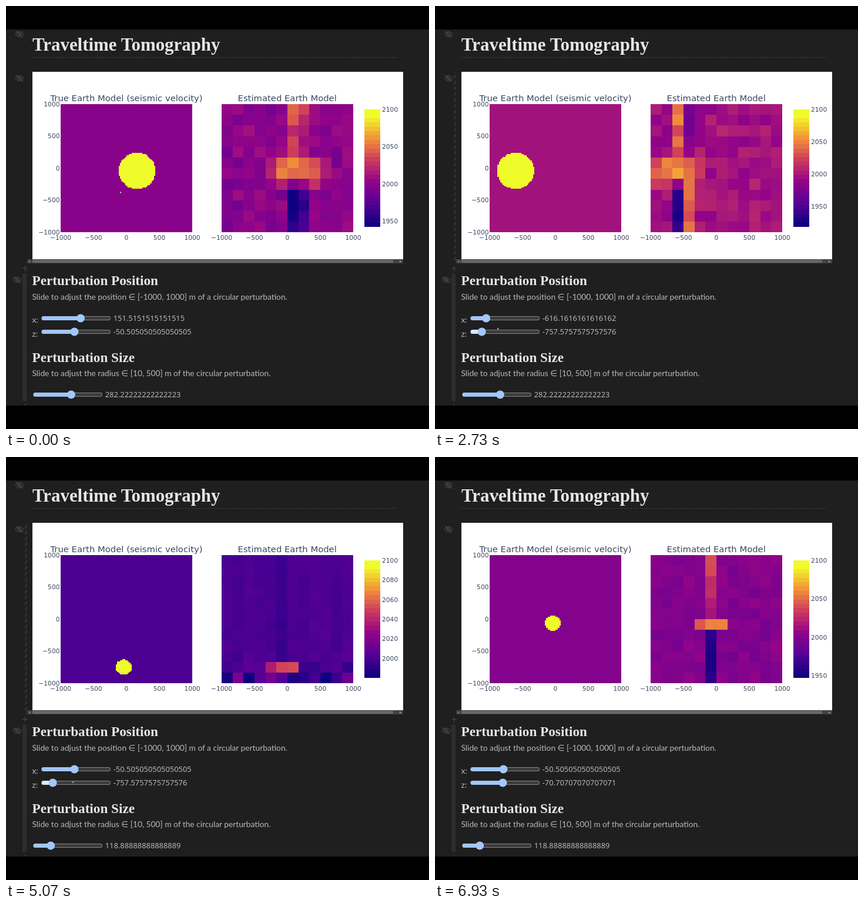
An HTML page with a canvas that plays this animation: 720x720 px, repeating every 6990 ms.

```html
<!DOCTYPE html>
<html lang="en">
<head>
<meta charset="utf-8">
<title>Traveltime Tomography</title>
<style>
  html, body { margin: 0; width: 100%; height: 100%; overflow: hidden; background: #000; }
  canvas, svg { position: absolute; left: 0; top: 0; width: 720px; height: 720px; }
  .h { font: bold 23.2px "Liberation Serif", serif; fill: #e6e6e6; }
  .h1 { font-size: 30.9px; }
  .p { font: 13.75px Lato, "DejaVu Sans", sans-serif; fill: #b9b9b9; }
  .v { font: 12.9px "Noto Sans", "Open Sans", sans-serif; fill: #b9b9b9; }
  .t { font: 14.8px "DejaVu Sans", sans-serif; fill: #3b4660; text-anchor: middle; }
  .k { font: 10.7px "DejaVu Sans", sans-serif; fill: #3b4660; }
  .mid { text-anchor: middle; }
  .end { text-anchor: end; }
</style>
</head>
<body>
<canvas id="stage" width="720" height="720"></canvas>
<svg id="labels" viewBox="0 0 720 720"></svg>
<script>
const LOOP = 6990;
const BEFORE = -200;
const ctx = document.getElementById('stage').getContext('2d');
const labels = document.getElementById('labels');

// Plot boxes share top and size
const TRUE_LEFT = 93, EST_LEFT = 367, TOP = 167, WIDTH = 224, HEIGHT = 218.4;

// Evenly spaced colour stops, low to high velocity
const RAMP = ['100080', '570096', '930488', 'cf3c5c', 'f39637', 'f0fb2a']
  .map(hex => [0, 2, 4].map(i => parseInt(hex.slice(i, i + 2), 16)));

// steps: [time, setting from 0 to 99]
const SLIDERS = [
  { left: 61, y: 531.5, min: -1000, max: 1000, steps: [[BEFORE, 57], [1600, 19], [4530, 47]] },
  { left: 61, y: 554.5, min: -1000, max: 1000, steps: [[BEFORE, 47], [2200, 12], [5270, 46]] },
  { left: 47, y: 661.5, min: 10, max: 500, steps: [[BEFORE, 55], [3800, 22]] }
];

// Each run reads the sliders at `from` and shows its result at `at`.
// low: lowest velocity; side: share of the streak in the next column
const RUNS = [
  { from: BEFORE, at: -100, low: 1942, side: .7 },
  { from: 1600, at: 2400, low: 1918, side: -.6 },
  { from: 2200, at: 2800, low: 1975, side: 0 },
  { from: 3800, at: 4200, low: 1954, side: 0 },
  { from: 4530, at: 5070, low: 1980, side: 0 },
  { from: 5270, at: 5730, low: 1947, side: 0 }
];

const POINTER = [
  [0, 195, 317], [400, 112, 664], [730, 97, 538], [1530, 90, 533],
  [2130, 81, 555], [2730, 107, 549], [3600, 85, 662], [4270, 107, 547],
  [5270, 115, 554], [5600, 215, 394], [6270, 120, 645], [6930, 107, 64]
];

const latest = (list, test) => list.filter(test).pop();
const mix = (a, b, f) => a + (b - a) * f;

function ramp(v) {
  const p = Math.max(0, Math.min(1, v)) * (RAMP.length - 1);
  const i = Math.min(Math.floor(p), RAMP.length - 2);
  return `rgb(${RAMP[i].map((n, k) => Math.round(mix(n, RAMP[i + 1][k], p - i)))})`;
}

function noise(a, b, seed) {
  const s = Math.sin(a * 127.1 + b * 311.7 + seed * 74.7) * 43758.5453;
  return (s - Math.floor(s)) * 2 - 1;
}

function settingAt(s, t) {
  return latest(s.steps, e => e[0] <= t)[1];
}

// One division keeps the printed digits exact
function valueAt(s, t) {
  return (s.min * 99 + (s.max - s.min) * settingAt(s, t)) / 99;
}

for (const run of RUNS) {
  [run.x, run.z, run.r] = SLIDERS.map(s => valueAt(s, run.from));
  run.base = (2000 - run.low) / (2100 - run.low);
}

function pointerAt(t) {
  const a = latest(POINTER, p => p[0] <= t);
  const b = POINTER[POINTER.indexOf(a) + 1] || a;
  const f = (t - a[0]) / (b[0] - a[0] || 1);
  const ease = f * f * (3 - 2 * f);
  return [mix(a[1], b[1], ease), mix(a[2], b[2], ease)];
}

function fill(color, x, y, w, h) {
  ctx.fillStyle = color;
  ctx.fillRect(x, y, w, h);
}

// Fills cells of an n by n grid on whole pixels so that neighbours meet
function cell(left, n, c, r, w, color) {
  const x0 = Math.round(left + WIDTH * c / n), x1 = Math.round(left + WIDTH * (c + w) / n);
  const y0 = Math.round(TOP + HEIGHT * r / n), y1 = Math.round(TOP + HEIGHT * (r + 1) / n);
  fill(color, x0, y0, x1 - x0, y1 - y0);
}

// The true model is sampled every 20 m
function drawTrue({ x, z, r, base }) {
  cell(TRUE_LEFT, 1, 0, 0, 1, ramp(base));
  for (let j = 0; j < 100; j++) {
    const dz = -1000 + 20 * j - z;
    if (Math.abs(dz) >= r) continue;
    const half = Math.sqrt(r * r - dz * dz);
    const first = Math.ceil((x - half + 1000) / 20);
    const last = Math.floor((x + half + 1000) / 20);
    cell(TRUE_LEFT, 100, first, 99 - j, last - first + 1, ramp(1));
  }
}

// Level of an estimated cell: grain, streaks above and below, then the smeared body
function estimate(run, c, r) {
  const col = (run.x + 1000) / 2000 * 12, row = (1000 - run.z) / 2000 * 12;
  const size = run.r / 2000 * 12;
  const dx = c + .5 - col, dy = r + .5 - row;
  const deep = run.z < -500;
  const seed = run.low;
  const grain = deep ? .012 + .2 * (r / 11) ** 12 : .02 + .03 * size;
  let v = run.base + .013 * noise(c, 40, seed) + grain * noise(c, r, seed);

  if (deep) {
    if (dy < -size * .75 - .2) v -= .085 * size * Math.exp(-(((dx + .5) / size) ** 2));
  } else {
    const next = c - Math.floor(col);
    const share = next === 0 ? 1 : next === 1 ? run.side : 0;
    v += share * (dy < 0 ? .28 * (1 - .6 * r / row) : .05 - run.base);
  }
  const body = Math.exp(-((dx / (size + .7)) ** 6) - (dy / (size * .75)) ** 4);
  const peak = (deep ? .65 : .76) + .07 * noise(r, c, seed);
  return mix(v, peak, body);
}

function drawEstimate(run) {
  for (let c = 0; c < 12; c++)
    for (let r = 0; r < 12; r++)
      cell(EST_LEFT, 12, c, r, 1, ramp(estimate(run, c, r)));
}

function drawColorbar() {
  const n = 27;
  for (let i = 0; i < n; i++) {
    const y0 = Math.round(376 - 200 * (i + 1) / n), y1 = Math.round(376 - 200 * i / n);
    fill(ramp(i / (n - 2)), 610, y0, 27, y1 - y0);
  }
}

function stroke(color, width, path) {
  ctx.strokeStyle = color;
  ctx.lineWidth = width;
  ctx.stroke(new Path2D(path));
}

function pill(x, y, w, h, color) {
  ctx.fillStyle = color;
  ctx.beginPath();
  ctx.roundRect(x, y, w, h, Math.min(w, h) / 2);
  ctx.fill();
}

function eye(x, y) {
  ctx.save();
  ctx.translate(x, y);
  stroke('#4d4d4d', 1.1, 'M-7 0Q0-9 7 0Q0 9-7 0M-2.5 0a2.5 2.5 0 1 0 5 0a2.5 2.5 0 1 0-5 0M-6-5.5L6 5.5');
  ctx.restore();
}

function drawPage() {
  fill('#000', 0, 0, 720, 720);
  fill('#1f1f1f', 0, 40, 720, 640);
  eye(23, 48);
  eye(23, 123);
  eye(19, 466);
  ctx.setLineDash([2, 2]);
  stroke('#484848', 1, 'M45 87.5H666');
  ctx.setLineDash([]);
  fill('#fff', 45, 112, 631, 319);
  fill('#424242', 36, 431, 640, 7);
  fill('#686868', 45, 432, 614, 5);
  ctx.fillStyle = '#a0a0a0';
  ctx.fill(new Path2D('M41 433v4l-2-2zM670 433v4l3-2z'));
  stroke('#4a4a4a', 1, 'M28 446.5H37M32.5 442V451M32.5 677V680');
  pill(28, 455, 7, 218, '#2e2e2e');
}

function drawRunning(t) {
  ctx.save();
  ctx.beginPath();
  ctx.rect(32, 112, 4, 326);
  ctx.clip();
  const shift = t / 40 % 10;
  for (let y = 102; y < 450; y += 10)
    stroke('#303030', 4, `M30 ${y + shift + 4}L38 ${y + shift - 4}`);
  ctx.restore();
}

function drawSlider(s, t, [px, py]) {
  const x = s.left + 6 + settingAt(s, t) * 1.052;
  const hover = px > s.left && px < s.left + 116 && Math.abs(py - s.y) < 8;
  pill(s.left - .5, s.y - 3.5, 117.5, 7, '#858585');
  pill(s.left + .5, s.y - 2.5, 115.5, 5, '#3b3b3b');
  pill(s.left - .5, s.y - 3.5, x - s.left, 7, hover ? '#dbe9fc' : '#a2c6f9');
  pill(x - 7, s.y - 7, 14, 14, '#a2c8fb');
  setText(s.label, valueAt(s, t));
}

function drawPointer([x, y]) {
  const onAxis = x > 93 && x < 317 && y > 385 && y < 400;
  if (onAxis) return fill('#555', x, y - 2, 1, 5);
  ctx.fillStyle = '#e8e8e8';
  const path = `M${x - 1} ${y - 2}l3 3l-3 1z`;
  ctx.fill(new Path2D(path));
  stroke('#333', .5, path);
}

function text(cls, x, y, str) {
  const el = document.createElementNS('http://www.w3.org/2000/svg', 'text');
  el.setAttribute('class', cls);
  el.setAttribute('x', x);
  el.setAttribute('y', y);
  el.textContent = str;
  labels.append(el);
  return el;
}

function setText(el, value) {
  const str = String(value);
  if (el.textContent !== str) el.textContent = str;
}

text('h h1', 45, 76, 'Traveltime Tomography');
text('h', 44.5, 475, 'Perturbation Position');
text('h', 44.5, 605.5, 'Perturbation Size');
text('p', 44.5, 500, 'Slide to adjust the position ∈ [-1000, 1000] m of a circular perturbation.');
text('p', 44.5, 630, 'Slide to adjust the radius ∈ [10, 500] m of the circular perturbation.');
text('p', 44.5, 538.5, 'x:');
text('p', 44.5, 562.5, 'z:');
text('t', 205, 162, 'True Earth Model (seismic velocity)');
text('t', 478.7, 162, 'Estimated Earth Model');
for (let i = 0; i < 5; i++) {
  const str = String(-1000 + 500 * i).replace('-', '−');
  for (const left of [TRUE_LEFT, EST_LEFT]) text('k mid', left + WIDTH * i / 4, 397.5, str);
  text('k end', 91.5, 389 - HEIGHT * i / 4, str);
}
for (const s of SLIDERS) s.label = text('v', s.left + 121.7, s.y + 4, '');
const ticks = Array.from({ length: 7 }, () => text('k', 640, 0, ''));

function setTicks(low) {
  const gap = 2100 - low < 140 ? 20 : 50;
  ticks.forEach((el, i) => {
    const v = 2100 - gap * i;
    setText(el, v < low + 1 ? '' : v);
    el.setAttribute('y', 380 - 200 * (v - low) / (2100 - low));
  });
}

function draw() {
  const t = performance.now() % LOOP;
  const run = latest(RUNS, r => r.at <= t);
  const pointer = pointerAt(t);
  drawPage();
  drawTrue(run);
  drawEstimate(run);
  drawColorbar();
  setTicks(run.low);
  if (RUNS.some(r => t >= r.from && t < r.at + 100)) drawRunning(t);
  for (const s of SLIDERS) drawSlider(s, t, pointer);
  drawPointer(pointer);
  requestAnimationFrame(draw);
}
draw();
</script>
</body>
</html>
```
